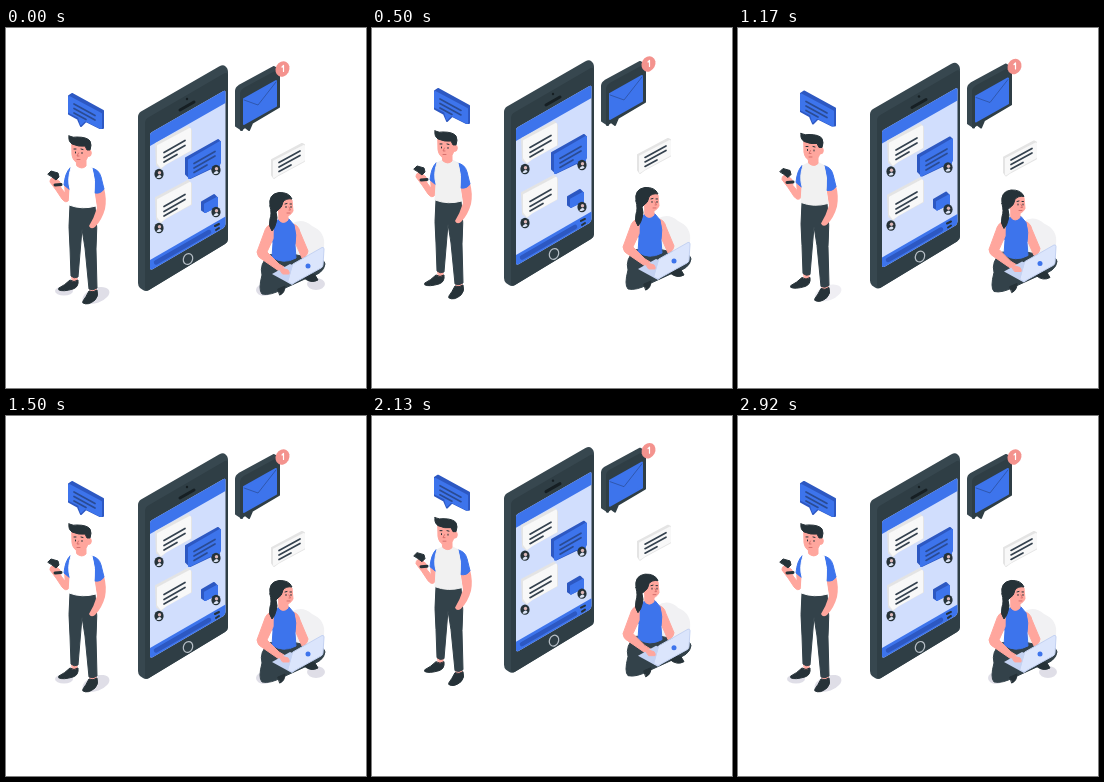
Animation of 360x360 px, one loop 2.96 s. Source, as an HTML page:

```html
<!DOCTYPE html>
<html lang="en">
<head>
<meta charset="utf-8">
<style>
html, body { margin: 0; width: 100%; height: 100%; overflow: hidden; background: #fff }
svg { display: block; width: 360px; height: 360px }
path { stroke-linejoin: round; stroke-linecap: round }
.dark { fill: #263238; stroke: #263238 }
.slate { fill: #2f3e45; stroke: #2f3e45 }
.edge { fill: #37474f; stroke: #37474f }
.cloth { fill: #33424a; stroke: #33424a }
.blue { fill: #3d74ec; stroke: #3d74ec }
.navy { fill: #2d58c2; stroke: #2d58c2 }
.skin { fill: #ffa69d; stroke: #ffa69d }
.white { fill: #f8f8f8; stroke: #f8f8f8 }
.grey { fill: #e4e4e4; stroke: #e4e4e4 }
.shirt { fill: var(--shirt); stroke: var(--shirt) }
.shade { fill: #dfdee7 }
.ink { fill: none; stroke: #263238 }
.lips { fill: none; stroke: #d66f6c }
.flat { stroke: none }
.mid { stroke-width: 2 }
.text { fill: none; stroke-width: 1.7; stroke: #34414e }
.text.on { stroke: #2a4b93 }
</style>
</head>
<body>
<svg viewBox="0 0 360 360">
<defs>
  <g id="note">
    <path class="grey mid" d="M150 116L182 99L185 102L185 122L159 136L155 140L151 137Z"/>
    <path class="white mid" d="M152 118L184 101V122L160 135.5L155 139L152 135Z"/>
    <path class="text" d="M158 124.5L179 112.5M158 129.5L179 117.5M158 134L171 126.5"/>
  </g>
  <g id="face">
    <ellipse rx="4.6" ry="5.2" fill="#263238"/>
    <path d="M-2.6 3.5Q0 -1 2.6 2.4Q1 5 -2.6 3.5" fill="#dce4f5"/>
    <circle cx=".5" cy="-1.2" r="1.7" fill="#dcb8b8"/>
  </g>
</defs>
<g id="scene">
  <g id="ground">
    <ellipse class="shade" cx="90" cy="267.5" rx="14" ry="7.5" transform="rotate(-20 90 267.5)"/>
  </g>
  <g id="faint" class="shade">
    <ellipse cx="58" cy="263" rx="9" ry="4.5"/>
    <ellipse cx="310" cy="256" rx="9" ry="6"/>
    <ellipse cx="258" cy="262" rx="8" ry="6"/>
  </g>

  <!-- phone -->
  <path class="edge flat" d="M132 89Q132 85.5 135 83.5L213 38.5Q217 36.5 219 38Q222 40 222 44V211Q222 214 219 216L143 262Q140 264 137 262L134 260Q132 258 132 255Z"/>
  <path class="slate flat" d="M139 95Q139 91 143 89L217 46Q222 43 222 48V211Q222 214 219 216L143 262Q139 264 139 259Z"/>
  <path class="ink" style="stroke:#161f23" stroke-width="3" d="M174 82L188 74"/>
  <circle cx="181" cy="71" r="1.2" fill="#161f23"/>
  <ellipse cx="182" cy="231" rx="4.5" ry="5.6" transform="rotate(25 182 231)" fill="none" stroke="#b8c0c8" stroke-width="1.2"/>
  <path fill="#d1defd" d="M144 107Q144 105 146 104L217.5 63Q219.5 62 219.5 64V196Q219.5 198 217.5 200L147 241Q144 242.500 144 240Z"/>
  <path class="blue flat" d="M144 107Q144 105 146 104L217.5 63Q219.5 62 219.5 64V75L144 118Z"/>
  <path class="blue flat" d="M144 232L219.5 188.500V196Q219.5 198 217.5 200L147 241Q144 242.500 144 240Z"/>
  <path class="navy" stroke-width="4.500" d="M150 234.500L203 204"/>
  <path class="ink" stroke-width="2" d="M209 198L213 196M210 202L213 200"/>
  <use href="#note"/>
  <use href="#note" y="54"/>
  <path class="navy mid" d="M180 130L212 112L214 114V134L210 145L205 140L184 150L180 146Z"/>
  <path class="blue mid" d="M183 132L214 114V134L210 145L205 139L183 150Z"/>
  <path class="text on" d="M188 135.500L209 123.500M188 140L209 128M188 144.500L201 137"/>
  <path class="navy mid" d="M196 174L208 167L211 170V178L199 184L196 182Z"/>
  <path class="blue mid" d="M199 176.500L211 170V182L206 180.500L199 184Z"/>
  <use href="#face" x="153" y="146"/>
  <use href="#face" x="153" y="200"/>
  <use href="#face" x="210" y="142"/>
  <use href="#face" x="210" y="184"/>

  <!-- mail -->
  <path class="edge mid" d="M230 63Q230 60 233 58L268 39L273 42L236 64V102L230 98Z"/>
  <path class="slate mid" d="M235 66Q235 63 238 61L273 42V79L246 95L243 102L239 99L235 102Z"/>
  <path class="blue mid" d="M238 71L270 53V78L238 96Z"/>
  <path class="text on" style="stroke-width:.7" d="M238 72L252 77L270 54"/>
  <ellipse cx="276.500" cy="41" rx="6.700" ry="8" transform="rotate(28 276.5 41)" fill="#f4938e"/>
  <path fill="none" stroke="#fff" stroke-width="1.200" d="M276 39L277.500 37.500V43.500"/>

  <!-- loose messages -->
  <path class="navy mid" d="M63 68L66 66L97 83V100L94 100L80 93L75 98L72 91L63 86Z"/>
  <path class="blue mid" d="M63 69L95 86V100L79 92L75 96L73 89L63 84Z"/>
  <path class="text on" d="M68 76L89 87.500M68 80.500L89 92M68 85L80 91.500"/>
  <path class="grey mid" d="M266 132L296 116L298 117V133L272 147L268 150L266 147Z"/>
  <path class="white mid" d="M268 133.500L298 118V132L274 145L268 149Z"/>
  <path class="text" d="M273 134.500L294 123M273 139L294 127.500M273 143.500L285 137"/>

  <!-- man -->
  <path class="skin" d="M66 248H71V256L67 257ZM84 259H90V265L85 266Z"/>
  <path class="dark" d="M53 260Q59 257 64 252Q68 255 72 252Q73 259 67 261Q57 264 53 262ZM77 273Q80 269 83 263Q87 265 91 262Q93 268 89 272Q82 278 77 275Z"/>
  <path class="cloth" d="M64 177L89 178Q92 200 90 221L91 260Q87 263 83 261L79 220L76 201L72 249Q68 251 65 248L64 220Q62 199 64 177Z"/>
  <path class="skin flat" d="M88 160L98 160Q101 171 99 181Q96 192 89 199Q85 202 83 198Q88 190 91 180Z"/>
  <path class="skin" d="M59 158L64 161L63 172Q60 176 56 171L50 162L44 154Q44 149 49 150L54 154L55 160L59 165Z"/>
  <path class="ink" stroke-width="3" d="M49 157L55 156.500"/>
  <path class="dark" d="M42 146L45 143L52 145L53 149L50 152L46 149Z"/>
  <path class="blue" d="M64 140Q59 145 58 157L64 162L67 146ZM85 140Q93 141 95 149L98 161Q95 166 89 165Z"/>
  <path class="shirt" d="M65 140L71 137H80L86 140Q90 152 88 166L90 178Q76 182 63 177L64 161Q61 151 65 140Z"/>
  <path class="skin" d="M70 128H80V138Q76 142 71 138Z"/>
  <path class="skin" d="M66 116Q73 111 81 117L82 128Q80 135 73 135Q67 134 66 127Z"/>
  <ellipse class="skin" cx="82.500" cy="125" rx="2.800" ry="3.500"/>
  <path class="dark" d="M63 108Q68 110 71 109Q81 109 84 113Q86 117 84 122L81 122L79 118Q73 119 66 116Q62 113 63 108Z"/>
  <path class="ink" stroke-width="1" d="M68 121H70M75 121L77 121.500M69.500 124V125M76 124.500V125.500"/>
  <path class="lips" d="M72.500 125L71 128H73M71 131.500H74"/>

  <!-- woman -->
  <path fill="#f1f1f3" d="M285 196Q296 189 306 198Q320 204 318 219L310 244Q292 249 286 232Z"/>
  <path class="cloth" d="M263 227Q253 236 256 247Q252 262 256 266Q264 268 277 261L301 250Q318 246 319 236Q318 230 309 231L286 226Z"/>
  <path class="dark" d="M299 245L309 247L312 252Q305 256 298 250ZM272 261L279 258Q279 265 274 267Z"/>
  <path class="skin" d="M286 196Q292 196 294 204L302 223Q301 229 296 230L288 212Z"/>
  <path class="blue" d="M268 194L274 191L283 191L288 197Q291 207 289 217L290 230Q277 237 266 229L267 215Q264 204 268 194Z"/>
  <path class="skin" d="M267 195Q260 197 258 205L251 224Q251 229 257 232L273 243L281 246L283 242L273 236L261 224L267 211Z"/>
  <path class="skin" d="M273 180H282V192Q277 197 273 192Z"/>
  <path class="skin" d="M271 173Q278 166 286 172L287 183Q284 189 278 188Q272 186 271 179Z"/>
  <path class="dark" d="M264 178Q262 166 273 164.500Q283 164 286 171Q280 170 277 174Q276 180 272 182L270 184Q272 190 270 195Q269 200 266 203Q262 198 264 191Q266 186 264 178Z"/>
  <path class="ink" stroke-width="1" d="M279 176L281 175.500M284 176H285.500M280 178.500V179.500M285 178.500V179.500"/>
  <path class="lips" d="M283 179L284.500 182H283M281 185H284"/>
  <path fill="#c4d2f2" d="M266 246L284 236L303 243L286 257Z"/>
  <path class="skin" d="M272 239L282 242L284 246L277 246Z"/>
  <path fill="#dbe5fc" stroke="#c4d2f2" d="M287 236L316 219.500Q318 219 318 221L317 237Q317 239 315 240L286 256L282 254Z"/>
  <circle cx="302" cy="238" r="2.500" fill="#3d74ec"/>
</g>
</svg>
<script>
const loop = 2960, fps = 24, bob = 71 / 2, height = 6.6;
const el = id => document.getElementById(id);
const scene = el('scene'), ground = el('ground'), faint = el('faint');

function draw(now) {
  const step = Math.floor((now % loop + 5) * fps / 1000);
  const lift = height / 2 * (1 - Math.cos(2 * Math.PI * step / bob));
  const tone = 255 - Math.min(14, lift * 9);
  scene.setAttribute('transform', `translate(0 ${-lift})`);
  scene.style.setProperty('--shirt', `rgb(${tone},${tone},${tone})`);
  ground.style.opacity = Math.max(0, 1 - lift / 5);
  faint.style.opacity = Math.max(0, 1 - lift / 1.8);
}

function tick() {
  draw(performance.now());
  requestAnimationFrame(tick);
}
tick();
</script>
</body>
</html>
```
